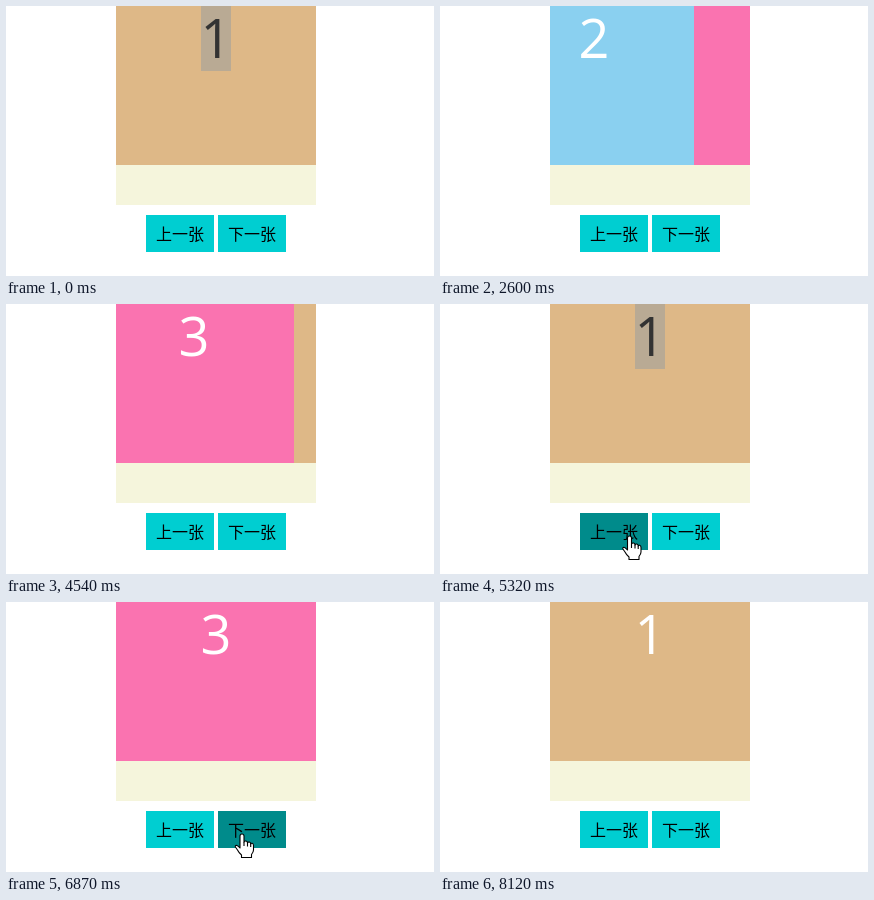
These frames come from a looping animation (428x270 px, 8660 ms). An HTML page:

```html
<!DOCTYPE html>
<html lang="zh">
<head>
<meta charset="utf-8">
<title>Carousel</title>
<style>
  html, body { margin: 0; width: 100%; height: 100%; overflow: hidden; background: #fff; }
  svg { display: block; }
  .digit { font: 54px "Open Sans", "Noto Sans", sans-serif; text-anchor: middle; fill: #fff; }
  .label { font: 16px "Noto Sans CJK SC", "Noto Sans CJK", sans-serif; text-anchor: middle; fill: #000; }
  .button { fill: #00ced1; }
  .button.hover { fill: #008b8b; }
  .cursor path { fill: #fff; stroke: #000; stroke-width: 1.1; stroke-linejoin: round; }
  .cursor .crease { fill: none; }
</style>
</head>
<body>
<svg width="428" height="270" viewBox="0 0 428 270">
  <clipPath id="window"><rect x="110" y="0" width="200" height="199"/></clipPath>
  <rect x="110" width="200" height="199" fill="#f5f5dc"/>
  <g clip-path="url(#window)"><g id="strip"></g></g>
  <g id="buttons"></g>
  <g id="hand" class="cursor">
    <path d="M-2 2Q-2 0 0 0Q2 0 2 2V8Q2.5 6.8 4 7Q5.5 7.2 5.5 9Q6 7.8 7.3 8Q8.7 8.3 8.7 10Q9.2 9 10.2 9.3Q11.5 9.7 11.5 11.5V16Q11.5 18 9.5 20.5V23.5H-.5V21Q-3 19-4.5 16L-6.6 13Q-7 11.3-5.6 11.2Q-4.4 11.2-2 14Z"/>
    <path class="crease" d="M2 8V12M5.5 9V12.5M8.7 10V13"/>
  </g>
  <g id="arrow" class="cursor">
    <path d="M0 0V16.5L4 13L6.5 18.7L9 17.6L6.6 12H11.8Z"/>
  </g>
</svg>
<script>
const LOOP = 8660, SLIDE_MS = 300, WIDTH = 200;
const CLICK = 5860, ENTER = 5020, LEAVE = 8120;

// Bursts of screen updates: first, last, count
const bursts = [
  [580, 900, 5], [2600, 2830, 4], [4540, 4850, 5], [5020, 5320, 5],
  [5860, 6330, 7], [6560, 6870, 5], [7340, 8120, 11]
];
// Slide moves: start, from, to
const moves = [[525, 0, 1], [2516, 1, 2], [4507, 2, 3], [5985, 3, 2], [7325, 2, 3]];
// Pointer: time, x, y
const trail = [
  [5020, 278, 262], [5098, 265, 254], [5175, 238, 242], [5253, 206, 235], [5320, 189.5, 232],
  [6520, 189.5, 232], [6870, 236, 232], [7670, 236, 232],
  [7808, 264, 243], [7886, 297, 250], [7964, 336, 257], [8042, 373, 263]
];

const $ = id => document.getElementById(id);
function add(parent, tag, attrs, text = "") {
  const el = document.createElementNS("http://www.w3.org/2000/svg", tag);
  for (const key in attrs) el.setAttribute(key, attrs[key]);
  el.textContent = text;
  return parent.appendChild(el);
}

const slides = [["1", "#deb887"], ["2", "#8ad0f0"], ["3", "#fa73b0"], ["1", "#deb887"]];
let mark, markedDigit;
slides.forEach(([digit, color], i) => {
  const x = 110 + i * WIDTH;
  add($("strip"), "rect", { x, y: 0, width: WIDTH, height: 159, fill: color });
  if (!i) mark = add($("strip"), "rect", { x: x + 85, y: 0, width: 30, height: 65, fill: "#b9aa94" });
  const text = add($("strip"), "text", { x: x + 100, y: 52, class: "digit" }, digit);
  if (!i) markedDigit = text;
});

const buttons = [[140, "上一张"], [212, "下一张"]].map(([x, label]) => {
  const el = add($("buttons"), "rect", { x, y: 209, width: 68, height: 37, class: "button" });
  add($("buttons"), "text", { x: x + 34, y: 234, class: "label" }, label);
  return { x, el };
});

function sampleTime(t) {
  const burst = bursts.filter(b => b[0] <= t).pop();
  if (!burst) return 0;
  const [first, last, count] = burst;
  const gap = (last - first) / (count - 1);
  return first + gap * Math.min(count - 1, Math.floor((t - first) / gap + 1e-6));
}

function slideAt(t) {
  const move = moves.filter(m => m[0] <= t).pop();
  if (!move) return 0;
  const [start, from, to] = move;
  const p = Math.min(1, (t - start) / SLIDE_MS);
  const pos = from + (to - from) * p;
  return pos === 3 ? 0 : pos;
}

function pointerAt(t) {
  const i = trail.findIndex(k => k[0] > t);
  if (i < 0) return trail[trail.length - 1].slice(1);
  const a = trail[Math.max(0, i - 1)], b = trail[i];
  const p = Math.max(0, (t - a[0]) / (b[0] - a[0] || 1));
  return [a[1] + (b[1] - a[1]) * p, a[2] + (b[2] - a[2]) * p];
}

function render(time) {
  const t = sampleTime(time % LOOP);
  $("strip").setAttribute("transform", `translate(${-Math.round(slideAt(t) * WIDTH)} 0)`);

  const selected = t < CLICK;
  mark.style.display = selected ? "" : "none";
  markedDigit.style.fill = selected ? "#333" : "#fff";

  const shown = t >= ENTER && t < LEAVE;
  const [x, y] = pointerAt(t);
  let over = false;
  for (const b of buttons) {
    const hit = shown && x >= b.x && x < b.x + 68 && y >= 209 && y < 246;
    b.el.classList.toggle("hover", hit);
    over = over || hit;
  }
  for (const id of ["hand", "arrow"]) {
    $(id).style.display = shown && over === (id === "hand") ? "" : "none";
    $(id).setAttribute("transform", `translate(${x} ${y})`);
  }
}

const begin = performance.now();
function tick() {
  render(performance.now() - begin);
  requestAnimationFrame(tick);
}
tick();
</script>
</body>
</html>
```
